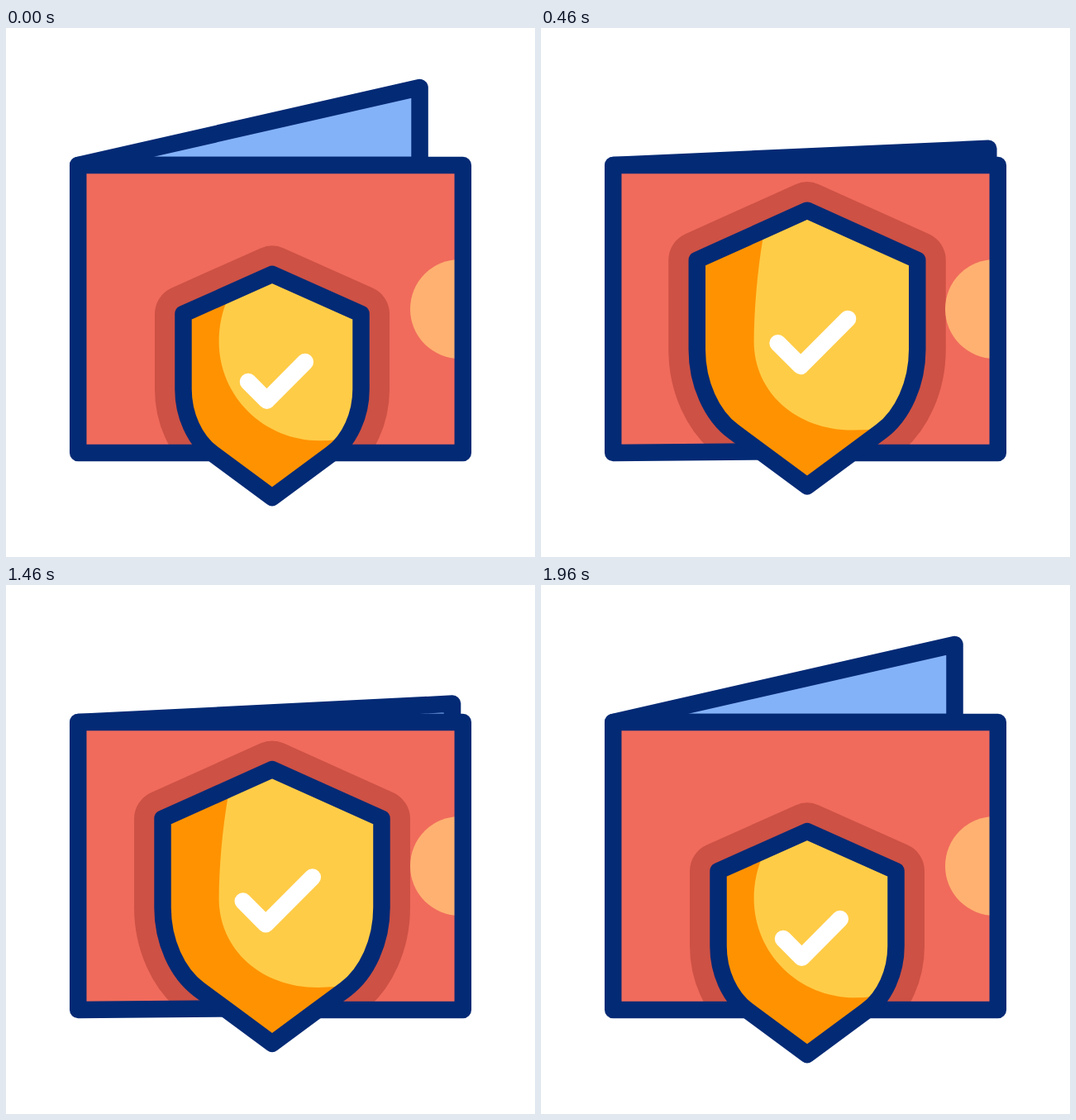
Animation of 640 by 640 pixels, one loop 2040 ms. Source, as an HTML page:

```html
<!DOCTYPE html>
<html lang="en">
<head>
<meta charset="utf-8">
<title>Protected wallet</title>
<style>
  html, body { margin: 0; width: 100%; height: 100%; overflow: hidden; background: #fff; }
  svg { display: block; width: 100%; height: 100%; }
  .line { fill: none; stroke: #032a75; stroke-width: 20.5; stroke-linecap: round; stroke-linejoin: round; }
</style>
</head>
<body>
<svg viewBox="0 0 640 640">
  <defs>
    <clipPath id="frontClip"><path class="front"/></clipPath>
    <clipPath id="shieldClip"><path class="shield"/></clipPath>
  </defs>
  <path class="flap line" style="fill:#84b2f8"/>
  <path class="front" fill="#f06b5c"/>
  <g clip-path="url(#frontClip)">
    <path class="shield" fill="#cd5145" stroke="#cd5145" stroke-width="69" stroke-linejoin="round"/>
    <circle cx="549" cy="340" r="60" fill="#ffb171"/>
  </g>
  <path class="front line"/>
  <path class="shield" fill="#ff9200"/>
  <path class="shine" fill="#ffcc47" clip-path="url(#shieldClip)"/>
  <path class="shield line"/>
  <path class="check line" style="stroke:#fff"/>
</svg>
<script>
const LOOP = 2040, FPS = 24, MOVE = 688;
const OPEN_AT = -20, CLOSE_AT = 1253;

const setPath = (name, d) =>
  document.querySelectorAll('path.' + name).forEach(el => el.setAttribute('d', d));

// cubic-bezier(.5, 0, .45, 1)
function ease(x) {
  if (x <= 0) return 0;
  if (x >= 1) return 1;
  let lo = 0, hi = 1;
  for (let i = 0; i < 30; i++) {
    const s = (lo + hi) / 2, r = 1 - s;
    if (1.5 * s * r * r + 1.35 * s * s * r + s * s * s < x) lo = s; else hi = s;
  }
  return lo * lo * (3 - 2 * lo);
}

function draw(p) {
  const mix = (a, b) => a + (b - a) * p;
  const pt = (x0, y0, x1, y1) => `${mix(x0, x1).toFixed(2)} ${mix(y0, y1).toFixed(2)} `;

  setPath('flap', 'M87.2 166L' + pt(500.5, 72, 548, 158) + 'V166Z');
  setPath('front', 'M' + pt(290, 513.9, 290, 511.9) + 'L87.2 513.9V166H552.8V513.9H350');

  // One half of the shield, mirrored about x = 322
  const half = side => (x0, y0, x1, y1) =>
    pt(322 + side * x0, y0, 322 + side * x1, y1);
  const l = half(-1), r = half(1);
  setPath('shield',
    'M' + l(0, 298, 0, 208) +
    'L' + r(107.5, 346, 137.5, 270) + 'L' + r(107.5, 437, 137.5, 381) +
    'C' + r(107.5, 468, 137.5, 424) + r(94, 498.5, 119, 464) + r(72, 514.8, 92, 484) +
    'L' + r(0, 568, 0, 552) + 'L' + l(72, 514.8, 92, 484) +
    'C' + l(94, 498.5, 119, 464) + l(107.5, 468, 137.5, 424) + l(107.5, 437, 137.5, 381) +
    'L' + l(107.5, 346, 137.5, 270) + 'Z');

  setPath('shine',
    'M' + pt(269, 326, 271, 228) +
    'C' + pt(261.5, 342, 262, 280) + pt(257.6, 361, 258, 335) + '257.6 379 ' +
    'C' + pt(257.6, 446, 257.6, 440) + pt(312, 499.3, 308, 484.5) + pt(380, 499.3, 377, 484.5) +
    'Q' + pt(402, 499.3, 396, 484.5) + pt(420, 494, 414, 482) +
    'L480 470V150H270Z');

  setPath('check',
    'M' + pt(293, 428, 285.5, 373.5) + 'L' + pt(315.5, 450.7, 314, 402) +
    'L' + pt(361.8, 404, 372.6, 343.3));
}

function frame(now) {
  const t = now % LOOP;
  // Hold each step for 1/24 s, with step starts rounded to 10 ms
  const step = Math.floor((Math.floor(t / 10) + 0.5) * FPS / 100);
  const ms = step * 1000 / FPS;
  draw(ease((ms - OPEN_AT) / MOVE) - ease((ms - CLOSE_AT) / MOVE));
}

const start = performance.now();
function tick() {
  frame(performance.now() - start);
  requestAnimationFrame(tick);
}
tick();
</script>
</body>
</html>
```
